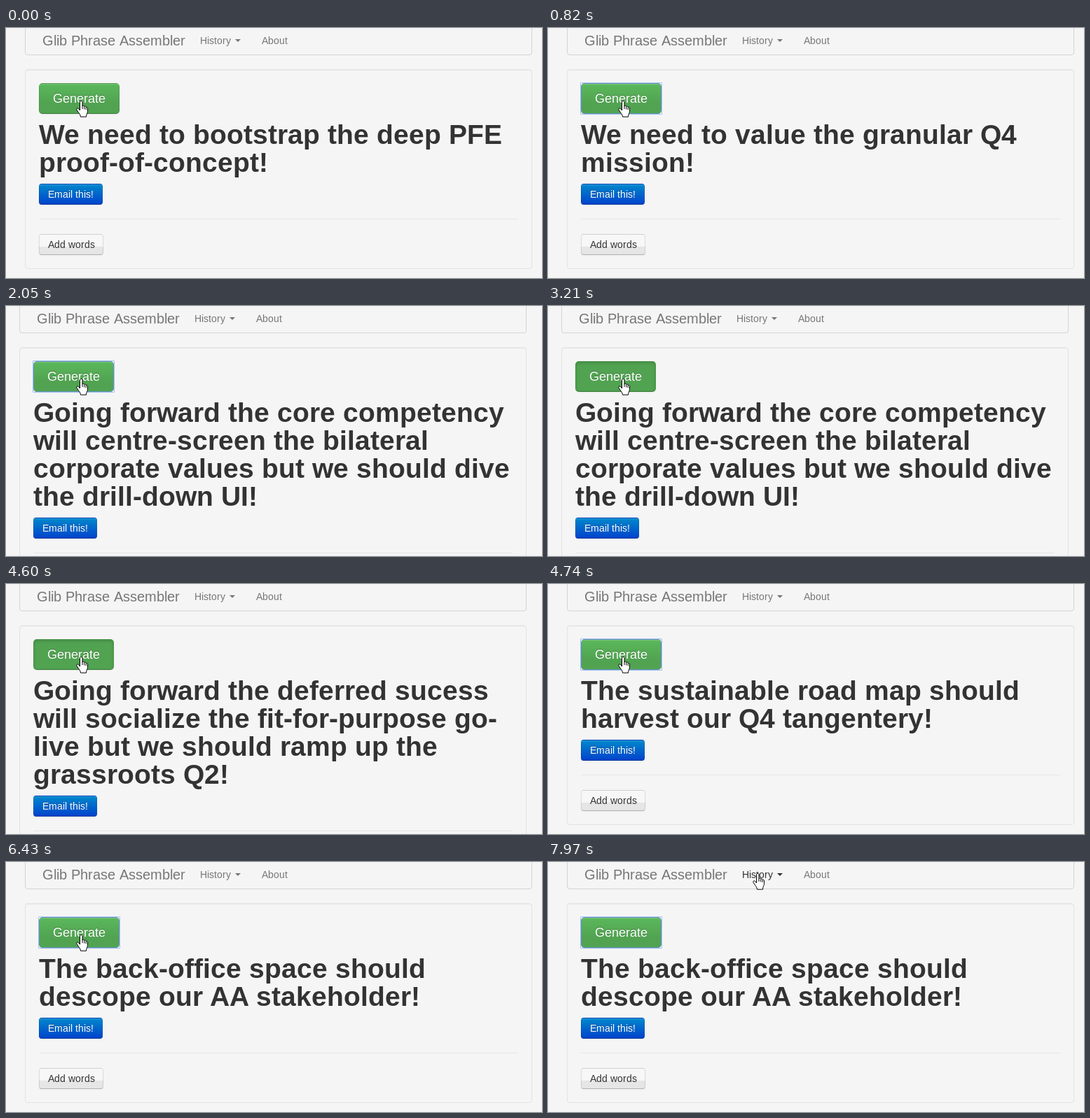
Animation, 765 px wide and 358 px high, one loop 8000 ms. Source, as an HTML page:

```html
<!DOCTYPE html>
<html lang="en">
<head>
<meta charset="utf-8">
<title>Phrase generator</title>
<style>
  html, body { margin: 0; width: 100%; height: 100%; overflow: hidden; background: #f5f5f5; }
  div { position: absolute; box-sizing: border-box; }
  svg { position: absolute; left: 0; top: 0; width: 1px; height: 1px; overflow: visible; }
  text { font-family: "Liberation Sans", Arial, sans-serif; font-variant-ligatures: none; fill: #333; }
  #stage { left: 0; top: 0; width: 765px; height: 358px; overflow: hidden; }
  #page { top: 0; width: 765px; height: 100%; }
  #nav { left: 27px; top: -10px; width: 724px; height: 49px; border: 1px solid #d4d4d4; border-radius: 4px; }
  #well { left: 27px; top: 59px; width: 724px; border: 1px solid #e3e3e3; border-radius: 4px;
    box-shadow: inset 0 1px 1px rgba(0,0,0,.05); }
  #lower { left: 0; width: 100%; }
  #rule { left: 47px; top: 50px; width: 684px; height: 1px; background: #e6e6e6; }
  .button { left: 47px; height: 30px; border: 1px solid; border-radius: 4px;
    border-color: rgba(0,0,0,.1) rgba(0,0,0,.1) rgba(0,0,0,.25);
    box-shadow: inset 0 1px 0 rgba(255,255,255,.2), 0 1px 2px rgba(0,0,0,.05); }
  .light text { fill: #fff; filter: drop-shadow(0 -1px 0 rgba(0,0,0,.25)); }
  #generate { top: 79px; width: 115px; height: 44px; border-radius: 5px;
    background: #51a351 linear-gradient(#5bb85b, #51a351 28px) repeat-x; }
  #generate.focus { border-color: #5f93b5; }
  #generate.focus::before { content: ""; position: absolute; inset: -2px;
    border: 1px solid #a3bfee; border-radius: 1px; }
  #generate.active { background: #51a351;
    box-shadow: inset 0 2px 4px rgba(0,0,0,.15), 0 1px 2px rgba(0,0,0,.05); }
  #email { top: 0; width: 91px; background: #04c linear-gradient(#08c, #04c) repeat-x; }
  #add { top: 72px; width: 92px; border-bottom-color: #b3b3b3;
    background: #e6e6e6 linear-gradient(#f7f7f7 62%, #e6e6e6 62%) repeat-x; }
  .menu text, .menu path { fill: #777; }
  .menu .hover { fill: #333; }
  .cursor path { fill: #fff; stroke: #000; stroke-linejoin: round; }
</style>
</head>
<body>
<div id="stage">
  <div id="page">
    <div id="nav"></div>
    <div id="well"></div>
    <svg class="menu" id="menu"><path id="caret" d="M327 16h8l-4 4z"/></svg>
    <div id="generate" class="button light"></div>
    <svg id="heading"></svg>
    <div id="lower">
      <div id="email" class="button light"></div>
      <div id="rule"></div>
      <div id="add" class="button"></div>
    </div>
  </div>
  <svg class="cursor">
    <g id="hand">
      <path d="M5.5 14V2C5.5 0 9 0 9 2V8C9 6.8 11.8 7 11.8 8.6C12.2 7.6 14 8 14.2 9.5C15 8.8 16.5 9.4 16.5 11V15.5C16.5 18 14.5 19 14.5 23.2H6.5C6.5 20 3.5 17.5 1 13.2C0 11.2 2.5 10 4 12Z"/>
      <path d="M9 8v4M11.8 9v3.5M14.2 10v3"/>
    </g>
    <g id="arrow"><path d="M.5 .5V16.5L4.2 13L6.7 18.5L9 17.5L6.6 12H11.5Z"/></g>
  </svg>
</div>
<script>
const $ = id => document.getElementById(id);
const ruler = document.createElement('canvas').getContext('2d');
const width = s => ruler.measureText(s).width;

// Whole-pixel advances, as in hinted screen text; bold text is kerned, also across spaces.
function addText(svg, x, y, size, string, bold = false) {
  const text = document.createElementNS('http://www.w3.org/2000/svg', 'text');
  ruler.font = `${bold ? 'bold ' : ''}${size}px "Liberation Sans", Arial, sans-serif`;
  ruler.fontKerning = 'normal';
  ruler.textRendering = 'optimizeLegibility';
  const xs = [...string].map((char, i) => {
    const here = x;
    const next = string[i + 1] || '';
    const kern = bold ? width(char + next) - width(char) - width(next) : 0;
    x += Math.round(width(char)) + Math.round(kern);
    return here;
  });
  text.setAttribute('x', xs.join(' '));
  text.setAttribute('y', y);
  text.setAttribute('font-size', size);
  if (bold) text.setAttribute('font-weight', 'bold');
  text.textContent = string;
  svg.append(text);
  return text;
}

function labelButton(id, x, y, size, string) {
  const svg = document.createElementNS('http://www.w3.org/2000/svg', 'svg');
  $(id).append(svg);
  addText(svg, x, y, size, string);
}

addText($('menu'), 52, 25, 20, 'Glib Phrase Assembler');
const historyLink = addText($('menu'), 277, 23, 14, 'History');
addText($('menu'), 365, 23, 14, 'About');
labelButton('generate', 19, 27, 18, 'Generate');
labelButton('email', 12, 19, 14, 'Email this!');
labelButton('add', 12, 19, 14, 'Add words');

const phrases = [
  ['We need to bootstrap the deep PFE', 'proof-of-concept!'],
  ['We need to value the granular Q4', 'mission!'],
  ['Going forward the core competency', 'will centre-screen the bilateral',
   'corporate values but we should dive', 'the drill-down UI!'],
  ['Going forward the deferred sucess', 'will socialize the fit-for-purpose go-',
   'live but we should ramp up the', 'grassroots Q2!'],
  ['The sustainable road map should', 'harvest our Q4 tangentery!'],
  ['The back-office space should', 'descope our AA stakeholder!'],
];
const phraseTimes = [0, 820, 2050, 3470, 4740, 6430];
const pressTimes = [530, 1770, 3210, 4600, 6150];
const cursorPath = [
  [0, 100, 104, 'hand'],
  [7420, 118, 96, 'hand'],
  [7560, 222, 49, 'arrow'],
  [7690, 266, 23, 'hand'],
  [7840, 282, 19, 'hand'],
  [7970, 292, 16, 'hand'],
];
const HOVER_TIME = 7690, LOOP = 8000;

let shownPhrase = -1;
function showPhrase(index) {
  if (index === shownPhrase) return;
  shownPhrase = index;
  const lines = phrases[index];
  const extra = (lines.length - 2) * 40;
  $('heading').replaceChildren();
  lines.forEach((line, i) => addText($('heading'), 47, 166 + 40 * i, 39, line, true));
  $('page').style.left = extra ? '-8px' : '0';
  $('well').style.height = 286 + extra + 'px';
  $('lower').style.top = 223 + extra + 'px';
}

function draw() {
  const t = performance.now() % LOOP;
  const phrase = phraseTimes.findLastIndex(start => start <= t);
  showPhrase(phrase);

  const pressed = t >= pressTimes[phrase];
  $('generate').classList.toggle('active', pressed);
  $('generate').classList.toggle('focus', phrase > 0 && !pressed);

  const [, x, y, shape] = cursorPath.findLast(([start]) => start <= t);
  for (const id of ['hand', 'arrow']) {
    $(id).setAttribute('transform', `translate(${x} ${y})`);
    $(id).style.display = id === shape ? '' : 'none';
  }
  for (const part of [historyLink, $('caret')]) part.classList.toggle('hover', t >= HOVER_TIME);
  requestAnimationFrame(draw);
}
draw();
</script>
</body>
</html>
```
